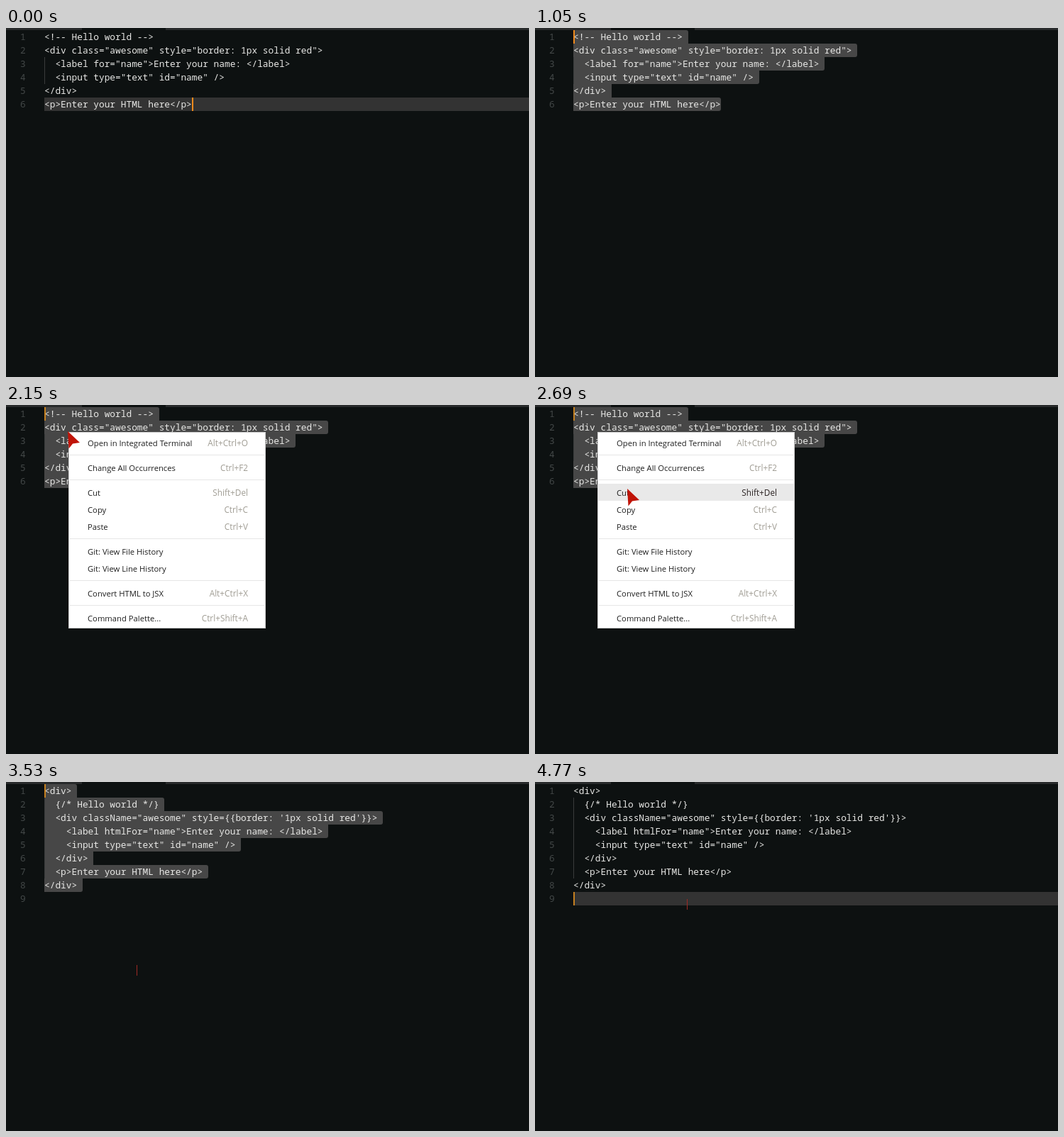
Write an HTML page that moves like this. It is 737x492 px and loops after 4940 ms.

```html
<!DOCTYPE html>
<html lang="en">
<head>
<meta charset="utf-8">
<title>Convert HTML to JSX</title>
<style>
  html, body { margin: 0; width: 100%; height: 100%; overflow: hidden; background: #0d1111; }
  #stage { position: relative; width: 737px; height: 492px; overflow: hidden; background: #0d1111; }
  #stage > *, .doc > *, .sel { position: absolute; }
  .tab { top: 0; height: 3px; background: #282a2b; }
  .doc { left: 0; top: 3px; font: 12.83px/19px "Noto Sans Mono", monospace; white-space: pre; }
  .code { left: 54px; color: #e8e8e6; }
  .num { left: 20px; color: #434848; }
  .guide { left: 54px; width: 1px; background: #3a3c3c; }
  #row { left: 54px; right: 0; height: 19px; background: #333; }
  .sel { height: 19px; }
  #caret { width: 2px; height: 19px; }
  #beam { left: 0; top: 0; width: 1px; height: 15px; background: #9e2a24; }
  #arrow { left: 0; top: 0; width: 20px; height: 26px; fill: #c01408; }
  #menu {
    left: 88px; top: 38px; width: 278px; height: 277px; box-sizing: border-box;
    padding: 2px 0; border: 1px solid #ccc; background: #fff;
    font: 11.25px/25px "Open Sans", sans-serif; color: #1e1e1e;
  }
  .item { display: flex; justify-content: space-between; height: 24px; padding: 0 24px 0 26px; white-space: pre; }
  .item kbd { font: inherit; font-size: 11.8px; color: #a09d94; }
  .item.on { background: #e9e9e9; }
  .item.on kbd { color: #2a2222; }
  .rule { height: 1px; margin: 5px 1px; background: #e6e6e6; }
</style>
</head>
<body>
<div id="stage">
  <div class="tab" style="left:0;width:107px"></div>
  <div class="tab" style="left:225px;right:0"></div>
  <div id="row"></div>
  <div id="sels"></div>
  <div id="html" class="doc"></div>
  <div id="jsx" class="doc"></div>
  <div id="caret"></div>
  <div id="menu"></div>
  <div id="beam"></div>
  <svg id="arrow" viewBox="0 0 20 26"><path d="M0 0L1.5 24.5L7 17.5L17 16Z"/></svg>
</div>
<script>
const LOOP = 4940, LEFT = 54, TOP = 3, LINE = 19, CHAR = 7.698;
const $ = id => document.getElementById(id);

const before = [
  '<!-- Hello world -->',
  '<div class="awesome" style="border: 1px solid red">',
  '  <label for="name">Enter your name: </label>',
  '  <input type="text" id="name" />',
  '</div>',
  '<p>Enter your HTML here</p>'
];
const after = [
  '<div>',
  '  {/* Hello world */}',
  '  <div className="awesome" style={{border: \'1px solid red\'}}>',
  '    <label htmlFor="name">Enter your name: </label>',
  '    <input type="text" id="name" />',
  '  </div>',
  '  <p>Enter your HTML here</p>',
  '</div>',
  ''
];
const entries = [
  ['Open in Integrated Terminal', 'Alt+Ctrl+O'], null,
  ['Change All Occurrences', 'Ctrl+F2'], null,
  ['Cut', 'Shift+Del'], ['Copy', 'Ctrl+C'], ['Paste', 'Ctrl+V'], null,
  ['Git: View File History', ''], ['Git: View Line History', ''], null,
  ['Convert HTML to JSX', 'Alt+Ctrl+X'], null,
  ['Command Palette...', 'Ctrl+Shift+A']
];

function add(parent, cls, text = '', tag = 'div') {
  const el = document.createElement(tag);
  el.className = cls;
  el.textContent = text;
  return parent.appendChild(el);
}

function buildDoc(doc, lines, guideFrom, guideTo) {
  const guide = add(doc, 'guide');
  guide.style.top = guideFrom * LINE + 'px';
  guide.style.height = (guideTo - guideFrom) * LINE + 'px';
  add(doc, 'num', lines.map((_, i) => i + 1).join('\n'));
  add(doc, 'code', lines.join('\n'));
}
buildDoc($('html'), before, 2, 4);
buildDoc($('jsx'), after, 1, 7);

const items = [];
for (const entry of entries) {
  if (!entry) { add($('menu'), 'rule'); continue; }
  const el = add($('menu'), 'item');
  add(el, '', entry[0], 'span');
  add(el, '', entry[1], 'kbd');
  items.push({ el, y: $('menu').offsetTop + 1 + el.offsetTop });
}
const bars = after.map(() => add($('sels'), 'sel'));

const linear = p => p;
const speedUp = p => p ** 2.4;
const slowDown = p => 1 - (1 - p) ** 2;
const smooth = p => p * p * (3 - 2 * p);

// Pointer moves: first step, last step, step count, from, to, easing
const moves = [
  [80, 590, 8, [264, 110], [130, 33], linear],
  [670, 1050, 6, [130, 33], [54, 10], slowDown],
  [1530, 1830, 5, [54, 10], [87, 37], smooth],
  [2380, 2840, 7, [87, 36], [183, 219], speedUp],
  [2920, 3300, 6, [183, 219], [183, 262], slowDown],
  [3850, 4310, 7, [184, 265], [214, 183], smooth],
  [4390, 4540, 3, [214, 183], [214, 172], slowDown]
];

function pointerAt(t) {
  if (t >= 3530 && t < 3850) return [184, 265];
  let pos = moves[0][3];
  for (const [start, end, steps, from, to, ease] of moves) {
    if (t < start) break;
    const done = Math.floor((t - start) / (end - start) * (steps - 1) + 1e-6) + 1;
    const p = ease(Math.min(1, done / steps));
    pos = from.map((v, i) => v + (to[i] - v) * p);
  }
  return pos;
}

function show(el, on) { el.style.display = on ? '' : 'none'; }
function place(el, x, y) { el.style.transform = `translate(${Math.round(x)}px,${Math.round(y)}px)`; }

function drawSelection(lines, start, end, color) {
  const span = r => {
    if (!start || r < start.row || r > end.row) return null;
    const from = r === start.row ? start.col : 0;
    const to = r === end.row ? end.col : lines[r].length + 1;
    return to > from ? [LEFT + from * CHAR, LEFT + to * CHAR] : null;
  };
  bars.forEach((bar, r) => {
    const s = span(r);
    show(bar, s);
    if (!s) return;
    const round = n => { const o = span(n); return !o || o[1] < s[1] ? '3px' : '0'; };
    bar.style.left = s[0] + 'px';
    bar.style.width = s[1] - s[0] + 'px';
    bar.style.top = TOP + r * LINE + 'px';
    bar.style.background = color;
    bar.style.borderRadius = `0 ${round(r - 1)} ${round(r + 1)} 0`;
  });
}

function render(t) {
  const [x, y] = pointerAt(t);
  const converted = t >= 3530, cleared = t >= 4770;
  const menuOpen = t >= 2150 && !converted;
  const lines = converted ? after : before;
  const last = lines.length - 1;
  const end = { row: last, col: lines[last].length };

  // The caret is the moving end of the selection
  let caret = { row: 0, col: 0 };
  if (t < 80 || cleared) caret = end;
  else if (t < 1050) {
    const row = Math.max(0, Math.min(last, Math.floor((y - TOP) / LINE)));
    const col = Math.round((x - LEFT) / CHAR);
    caret = { row, col: Math.max(0, Math.min(lines[row].length, col)) };
  }

  const idle = t < 80 || cleared;
  const blurred = t >= 2000 && t < 2150;
  drawSelection(lines, idle ? null : caret, end, blurred ? '#2b2b2b' : '#474747');
  show($('row'), idle);
  $('row').style.top = TOP + last * LINE + 'px';
  show($('html'), !converted);
  show($('jsx'), converted);

  show($('caret'), !(t >= 1530 && t < 2150) && !(t >= 4010 && t < 4540));
  $('caret').style.background = t < 1530 ? '#f08a1c' : '#c5801f';
  place($('caret'), LEFT + caret.col * CHAR, TOP + caret.row * LINE);

  show($('menu'), menuOpen);
  for (const { el, y: top } of items)
    el.classList.toggle('on', t >= 2380 && y >= top && y < top + 24);

  show($('arrow'), menuOpen);
  show($('beam'), !menuOpen && t >= 80 && !(t >= 1050 && t < 1530));
  place($('arrow'), x, y);
  place($('beam'), x, y - 7);
}

function tick() {
  render(performance.now() % LOOP);
  requestAnimationFrame(tick);
}
tick();
</script>
</body>
</html>
```
